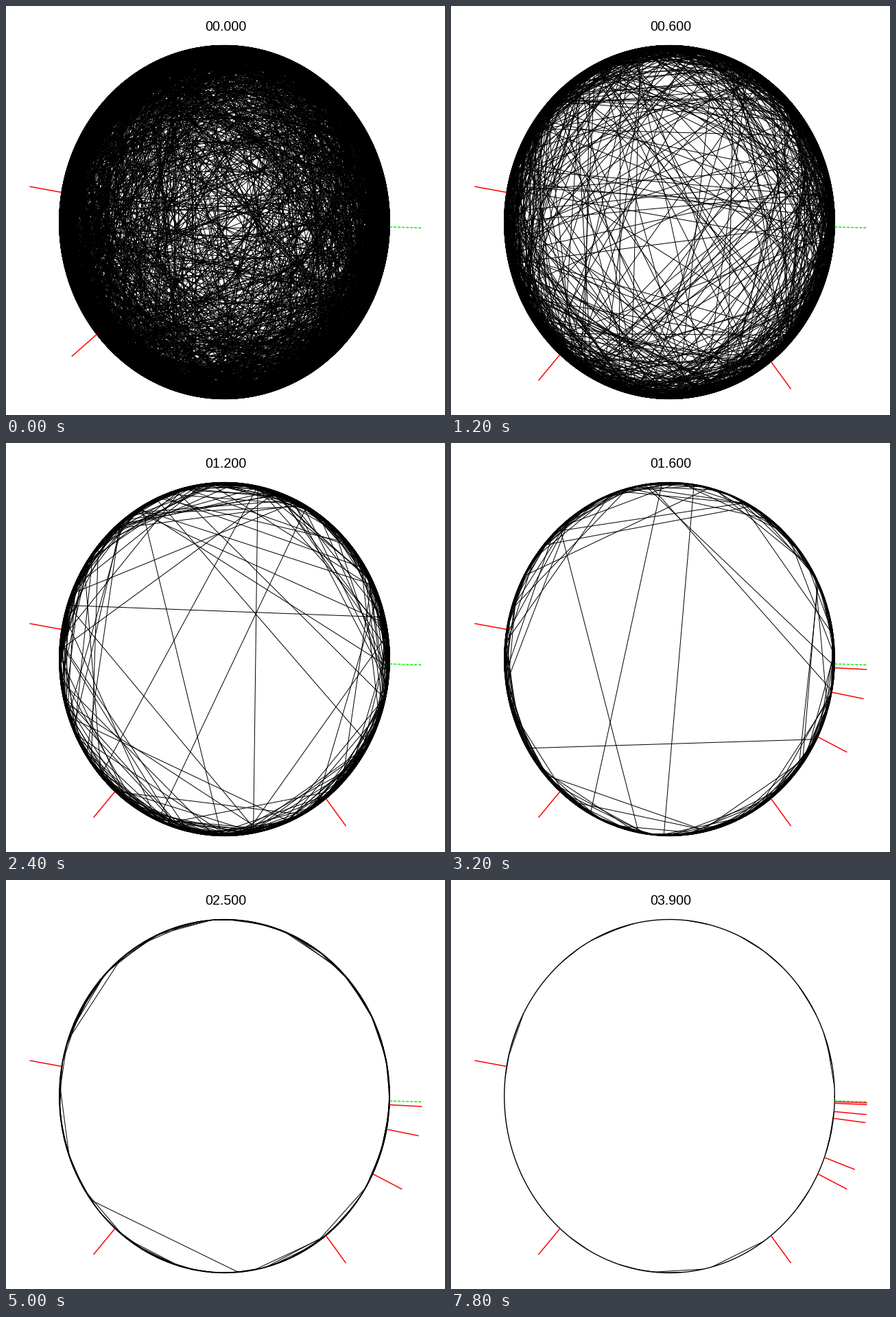
A matplotlib script for the animation above (8 s loop, 640 by 596 pixels).

```python
import numpy as np
import matplotlib.pyplot as plt
from matplotlib.animation import FuncAnimation
from matplotlib.collections import LineCollection

W, H, DPI = 640, 596, 100
CX, CY, RX, RY = 318.5, 315, 240.8, 257.5
FRAMES, STEP_MS = 40, 200
PX = 72 / DPI
TARGET = 1.55
MIN_SPAN = 0.04

# Route marks: angle in degrees, first step, step at which it goes.
HOPS = [(189.7, 0, 40), (140.6, 0, 2), (131.5, 2, 40), (52.1, 2, 40),
        (26.1, 16, 40), (10.8, 16, 27), (2.8, 16, 27), (20.3, 27, 40),
        (7.2, 27, 40), (2.3, 27, 40), (1.8, 27, 40), (5.0, 33, 40)]


def rim(deg, scale=1.0):
    a = np.radians(deg)
    return np.stack([CX + scale * RX * np.cos(a), CY + scale * RY * np.sin(a)], -1)


def chords(k):
    """Random chords whose span x (1 = diameter) thins out as x ** -(r + 1.6)."""
    r = k / 10
    p = -(r + 0.6)
    rng = np.random.default_rng(100 + k)
    bulge = 1 + 1.2 * np.sin(np.pi * (k / (FRAMES - 1)) ** 0.7)
    lo = MIN_SPAN ** p
    count = int(880 * 70 ** -r * bulge * (lo - 1) / -p)
    span = (lo + (1 - lo) * rng.random(count)) ** (1 / p)
    start = rng.uniform(0, 360, count)
    return np.stack([rim(start), rim(start + 180 * span)], 1)


def ticks(angles):
    a = np.array(angles)
    return np.stack([rim(a), rim(a, 1.197)], 1)


fig = plt.figure(figsize=(W / DPI, H / DPI), dpi=DPI, facecolor="white")
ax = fig.add_axes([0, 0, 1, 1])
ax.set_xlim(0, W)
ax.set_ylim(H, 0)
ax.axis("off")

links = LineCollection([], colors="black", linewidths=1.0 * PX, zorder=1)
route = LineCollection([], colors="red", linewidths=1.5 * PX, zorder=3)
ax.add_collection(links)
ax.add_collection(route)

ring = rim(np.linspace(0, 360, 361))
ax.plot(ring[:, 0], ring[:, 1], color="black", lw=1.4 * PX, zorder=2)
goal = ticks([TARGET])[0]
ax.plot(goal[:, 0], goal[:, 1], color="#00ee00", lw=1.5 * PX,
        dashes=(2.7, 1.3), dash_capstyle="butt", zorder=4)
label = ax.text(320, 36, "", family="Liberation Sans", size=19.6 * PX,
                ha="center", va="baseline", color="black")


def draw(k):
    links.set_segments(chords(k))
    route.set_segments(ticks([a for a, first, end in HOPS if first <= k < end]))
    label.set_text(f"{k / 10:06.3f}")
    return links, route, label


anim = FuncAnimation(fig, draw, frames=FRAMES, interval=STEP_MS,
                     repeat=True, repeat_delay=0, blit=False)
plt.show()
```
